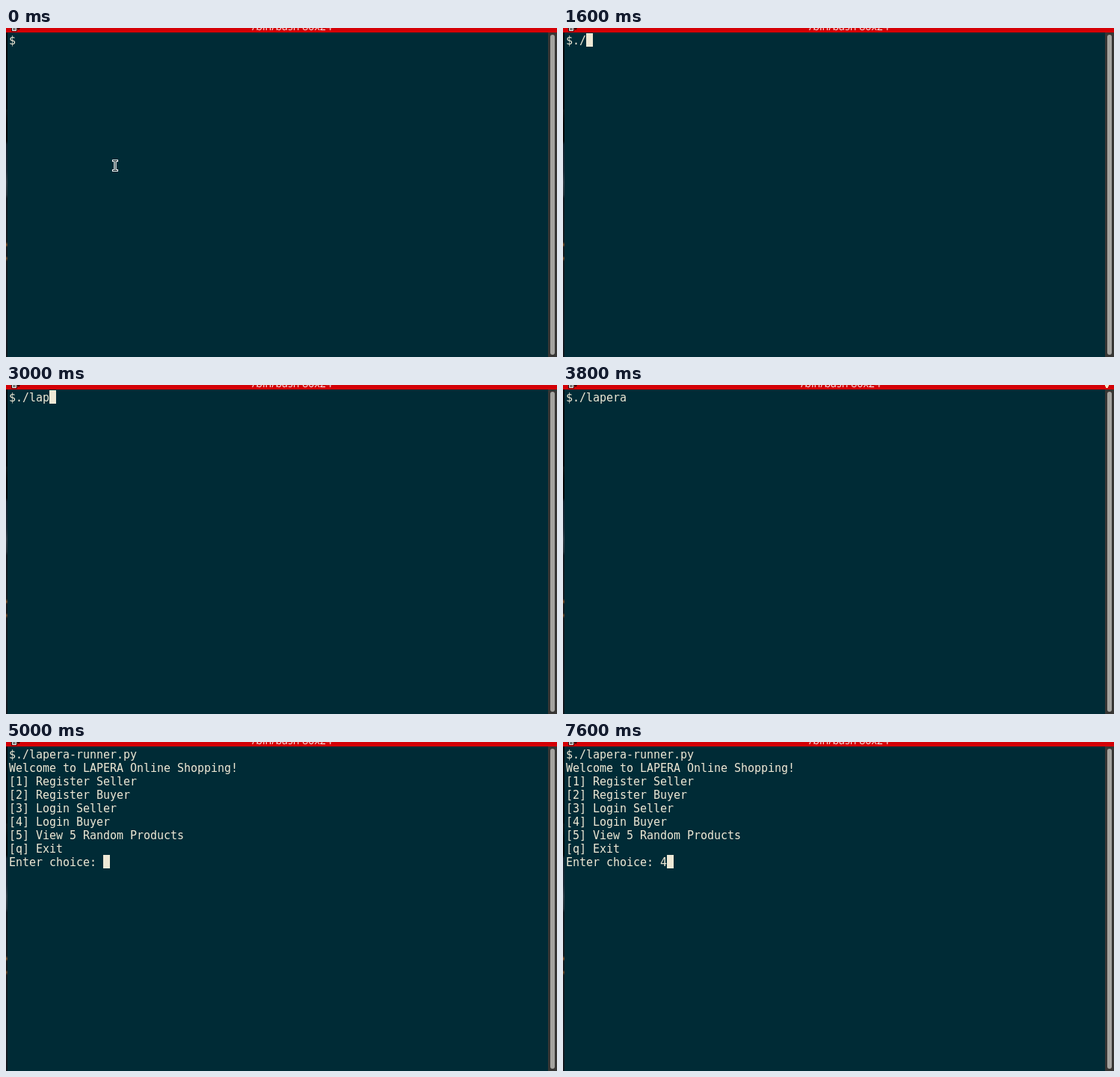
An HTML page for the animation above (8000 ms loop, 737 by 440 pixels).

```html
<!DOCTYPE html>
<html lang="en">
<head>
<meta charset="utf-8">
<title>Terminal</title>
<style>
  html, body { margin: 0; width: 100%; height: 100%; overflow: hidden; background: #002b36; }
  #stage { position: relative; width: 737px; height: 440px; overflow: hidden; background: #002b36; }
  #stage > * { position: absolute; }
  #desk {
    left: 0; top: 6px; width: 2px; height: 434px;
    background: linear-gradient(#050709 0 102px, #101314 104px, #030506 122px 145px, #14222e 150px,
      #1c2a36 185px, #344049 200px, #27323a 217px, #10181f 222px, #151b20 280px,
      #805028 284px, #171b1f 287px, #15191d 299px, #704826 302px, #15191d 306px,
      #11161d 350px, #141c24 400px, #10161c);
  }
  #bar { left: 0; top: 0; width: 737px; height: 6px; background: #d40006; overflow: hidden; }
  #title {
    position: absolute; left: 329px; top: -14px; white-space: pre;
    font: 14.2px/24px "Open Sans", "Noto Sans", sans-serif; color: #fbe9e9;
  }
  #icons { left: 0; top: 0; }
  #text {
    left: 4px; top: 8px; margin: 0; white-space: pre; color: #eee8d5;
    font: 15px/18px "DejaVu Sans Mono", monospace; letter-spacing: -0.03px;
  }
  #cursor { width: 9px; height: 18px; background: #eee8d5; }
  #track { left: 725px; top: 6px; width: 12px; height: 434px; background: #373634; }
  #thumb { left: 728px; top: 9px; width: 6px; height: 428px; border-radius: 3px; background: #a4a39f; }
</style>
</head>
<body>
<div id="stage">
  <div id="desk"></div>
  <div id="bar"><span id="title">/bin/bash 80x24</span></div>
  <pre id="text"></pre>
  <div id="cursor"></div>
  <div id="track"></div>
  <div id="thumb"></div>
  <svg id="icons" width="737" height="440">
    <path d="M7 0V4.5H15V0Z" fill="#1c0808"/>
    <path d="M8.5 0V3.5H13.5V0" fill="#777" stroke="#f4eeee"/>
    <path d="M15 0H19L17 3Z" fill="#2a0506"/>
    <g id="bell" fill="#f3e6c8">
      <path d="M725 0H730V2H725Z"/>
      <path d="M726 2H729V4H726Z"/>
    </g>
    <g id="pointer" fill="none" stroke-linecap="square">
      <path id="beam" d="M143.5 177.5H148.5M146 177.5V190.5M143.5 190.5H148.5" stroke="#f5f5f5" stroke-width="3"/>
      <use href="#beam"/>
      <path d="M143.5 177.5H148.5M146 177.5V190.5M143.5 190.5H148.5" stroke="#061a20"/>
    </g>
  </svg>
</div>
<script>
  const LOOP = 8000, CELL = 9, ROW = 18, LEFT = 4, TOP = 7;
  const command = "$./lapera-runner.py ";
  const menu = [
    command,
    "Welcome to LAPERA Online Shopping!",
    "[1] Register Seller",
    "[2] Register Buyer",
    "[3] Login Seller",
    "[4] Login Buyer",
    "[5] View 5 Random Products",
    "[q] Exit",
    "Enter choice: "
  ].join("\n");

  // start time, screen text, cursor shown
  const steps = [
    [0, "$", false],
    [400, "$", true],
    [1300, "$", false],
    [1500, "$.", true],
    [1600, "$./", true],
    [1800, "$./l", true],
    [1900, "$./la", true],
    [2500, "$./la", false],
    [2800, "$./la", true],
    [3000, "$./lap", true],
    [3200, "$./lapera", true],
    [3800, "$./lapera", false],
    [4200, command, true],
    [4700, command + "\n", true],
    [5000, menu, true],
    [5300, menu, false],
    [5900, menu, true],
    [6500, menu, false],
    [7100, menu, true],
    [7600, menu + "4", true]
  ];

  const el = id => document.getElementById(id);
  const show = (id, on) => { el(id).style.visibility = on ? "visible" : "hidden"; };
  let current;

  function draw(time) {
    const step = steps.findLast(s => s[0] <= time);
    if (step === current) return;
    current = step;

    const [start, text, cursorOn] = step;
    const lines = text.split("\n");
    const ringing = start >= 3200 && start < 4200;
    el("text").textContent = text;
    el("cursor").style.left = LEFT + lines.at(-1).length * CELL + "px";
    el("cursor").style.top = TOP + (lines.length - 1) * ROW + "px";
    el("title").style.left = (ringing ? 318 : 329) + "px";
    show("cursor", cursorOn);
    show("bell", ringing);
    show("pointer", start < 1500);
  }

  const origin = performance.now();
  function tick() {
    draw((performance.now() - origin) % LOOP);
    requestAnimationFrame(tick);
  }
  tick();
</script>
</body>
</html>
```
